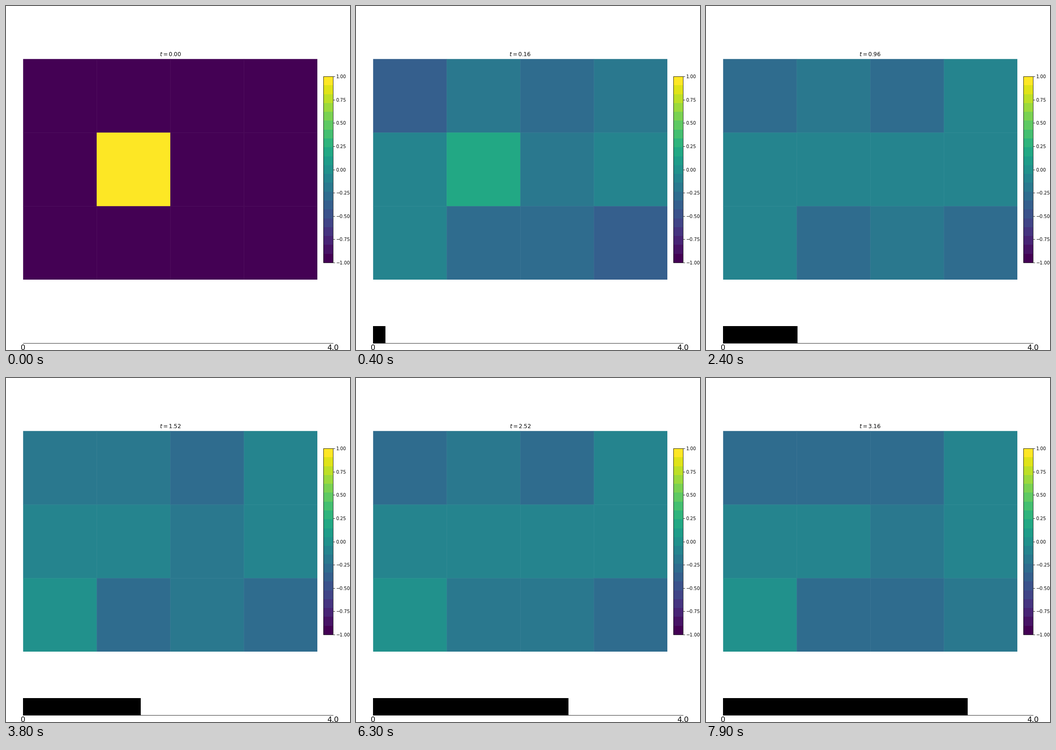
These frames come from a looping animation (748x748 px, 8000 ms). A matplotlib script:

```python
import numpy as np
import matplotlib.pyplot as plt
from matplotlib.animation import FuncAnimation
from matplotlib.collections import PolyCollection

SIZE, DPI = 748, 72
FRAMES, INTERVAL = 80, 100
DT, T_END = 0.04, 4.0
ROWS, COLS, LEVELS = 3, 4, 21

plt.rcParams["font.family"] = "DejaVu Sans"

# Colour level at which each cell settles, top row first
HOME = np.array([[7, 8, 7, 9], [9, 9, 8.6, 8.8], [9.4, 7.2, 7.5, 7.3]])


def build_levels():
    """Cells relax from a single hot spot, then waver around their home level."""
    start = np.zeros((ROWS, COLS))
    start[1, 1] = LEVELS - 1
    rate = np.where(start > 0, 0.32, 0.9)
    rng = np.random.default_rng(5)
    wobble = np.zeros((ROWS, COLS))
    levels = []
    for i in range(FRAMES):
        levels.append(HOME + (start - HOME) * np.exp(-rate * i) + wobble)
        wobble = 0.7 * wobble + 0.25 * rng.normal(size=wobble.shape)
    return np.clip(np.rint(levels), 0, LEVELS - 1)


def add_axes(x, y, w, h):
    """Axes from a pixel box measured from the top left."""
    return fig.add_axes([x / SIZE, 1 - (y + h) / SIZE, w / SIZE, h / SIZE])


def square(row, col):
    return [(col, row), (col + 1, row), (col + 1, row + 1), (col, row + 1)]


levels = build_levels()
fig = plt.figure(figsize=(SIZE / DPI, SIZE / DPI), dpi=DPI, facecolor="white")

left, span, middle = 0.05 * SIZE, 0.9 * SIZE, 355
width = 0.95 * span
height = width * ROWS / COLS
field = add_axes(left, middle - height / 2, width, height)
field.set_axis_off()
cells = PolyCollection([square(r, c) for r in range(ROWS) for c in range(COLS)],
                       array=levels[0].ravel(), edgecolors="face",
                       linewidths=0.5, cmap=plt.get_cmap("viridis", LEVELS))
cells.set_clim(-1, 1)
field.add_collection(cells)
field.set(xlim=(0, COLS), ylim=(ROWS, 0))
title = field.set_title("", fontsize=12)

cax = add_axes(left + 0.97 * span, 153, 0.03 * span, 405)
fig.colorbar(cells, cax=cax, ticks=np.linspace(-1, 1, 9))
cax.tick_params(labelsize=10)

clock = add_axes(left, 0.93 * SIZE, span, 0.05 * SIZE)
clock.set(xlim=(0, T_END), ylim=(0, 1), yticks=[])
clock.set_xticks([0, T_END], ["0", f"{T_END:.1f}"])
clock.tick_params(length=0, pad=3, labelsize=16)
clock.patch.set_visible(False)
clock.spines[["left", "right", "top"]].set_visible(False)
elapsed = clock.barh(0.5, 0, height=1, color="black", linewidth=0)[0]


def update(i):
    t = i * DT
    cells.set_array(levels[i].ravel() * 2 / (LEVELS - 1) - 1)
    title.set_text(f"$t = {t:.2f}$")
    elapsed.set_width(t)
    return cells, title, elapsed


anim = FuncAnimation(fig, update, frames=FRAMES, interval=INTERVAL,
                     repeat=True, repeat_delay=0, blit=False)
plt.show()
```
